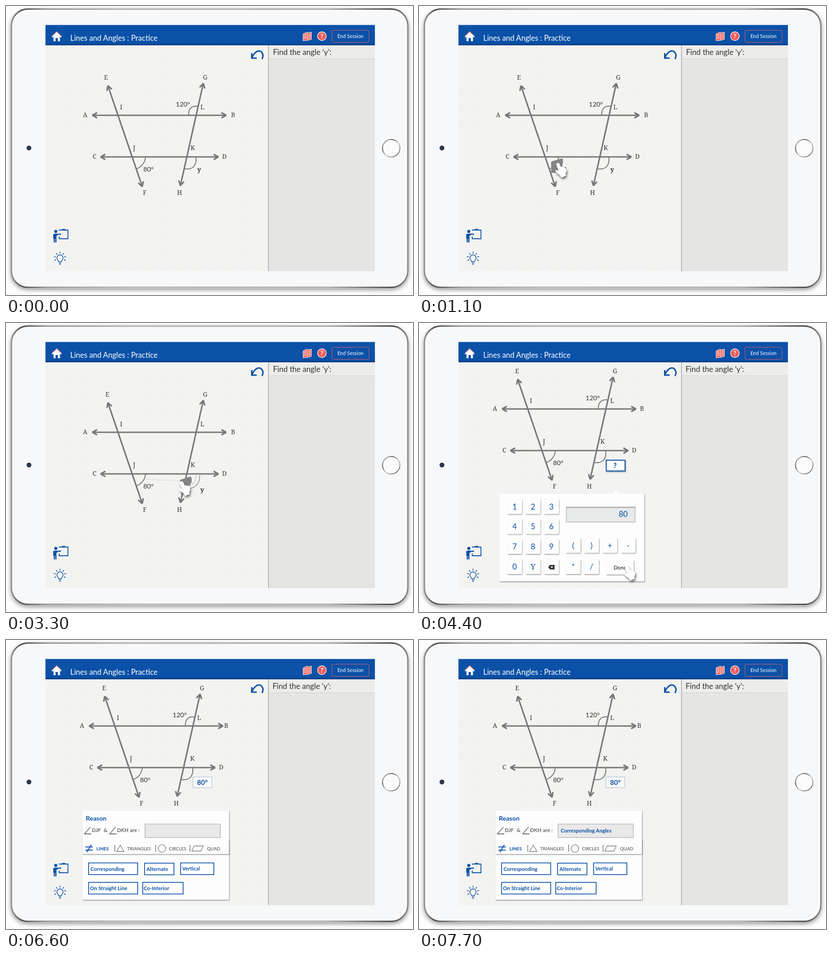
An HTML page for the animation above (8 s loop, 887 by 632 pixels).

```html
<!DOCTYPE html>
<html lang="en">
<head>
<meta charset="utf-8">
<title>Lines and Angles</title>
<style>
  html, body { margin: 0; width: 100%; height: 100%; overflow: hidden; background: #fdfdfd; }
  svg { display: block; width: 100vw; height: 100vh; }
  text { font-family: Lato, sans-serif; }
  .slab { font-family: "Noto Serif", serif; }
  .blue { fill: #0b51a8; }
  .line { fill: none; stroke: #777; }
  .ink { fill: none; stroke: #0b51a8; }
</style>
</head>
<body>
<svg viewBox="0 0 887 632">
  <defs>
    <linearGradient id="metal" x2="1" y2="0">
      <stop offset="0" stop-color="#8c8c8c"/><stop offset=".025" stop-color="#3c3c3c"/>
      <stop offset=".09" stop-color="#999"/><stop offset=".3" stop-color="#bbb"/>
      <stop offset=".8" stop-color="#b0b0b0"/><stop offset=".96" stop-color="#3c3c3c"/>
      <stop offset="1" stop-color="#808080"/>
    </linearGradient>
    <linearGradient id="ring" x2="1" y2="1">
      <stop offset="0" stop-color="#ddd"/><stop offset=".3" stop-color="#555"/>
      <stop offset=".55" stop-color="#ccc"/><stop offset="1" stop-color="#555"/>
    </linearGradient>
    <linearGradient id="edge" x2="0" y2="1">
      <stop offset="0" stop-color="#0b51a8"/><stop offset="1" stop-color="#083f86"/>
    </linearGradient>
    <pattern id="dots" width="5" height="5" patternUnits="userSpaceOnUse">
      <path d="M1 1h1v1h-1z" fill="#ebebe8"/>
    </pattern>
    <filter id="soft" x="-30%" y="-30%" width="180%" height="180%">
      <feDropShadow dx="1" dy="1.500" stdDeviation="1.2" flood-opacity=".42"/>
    </filter>
    <filter id="lift" x="-80%" y="-80%" width="300%" height="300%">
      <feDropShadow dx="2" dy="4" stdDeviation="3" flood-opacity=".6"/>
    </filter>
    <filter id="floor" x="-5%" y="-5%" width="110%" height="115%">
      <feDropShadow dx="0" dy="4" stdDeviation="4" flood-opacity=".38"/>
    </filter>
  </defs>

  <rect x="12" y="7" width="863.500" height="608" rx="36" fill="#f7f8fa" stroke="#c6c6c6" stroke-width="4.400" filter="url(#floor)"/>
  <rect x="11.500" y="6.500" width="864.500" height="609" rx="36.500" fill="none" stroke="url(#metal)" stroke-width="2.400"/>
  <rect x="15" y="10" width="857.500" height="602" rx="33" fill="none" stroke="#fff" stroke-width="2"/>
  <circle cx="50" cy="310.500" r="5.200" fill="#2b323e"/>
  <circle cx="49" cy="311" r="2" fill="#28477a"/>
  <circle cx="839.500" cy="311" r="19" fill="#fbfbfc" stroke="url(#ring)" stroke-width="2"/>

  <path d="M86 86h486v494H86z" fill="#f3f3f1"/>
  <path d="M86 86h486v494H86z" fill="url(#dots)"/>
  <path d="M572 86h232v494H572z" fill="#e5e5e4"/>
  <path d="M572 86h232v29H572z" fill="#ececea"/>
  <path d="M572 115.500h232" stroke="#cfcfcf"/>
  <path d="M572 86v494" stroke="#b9b9b9" stroke-width="2"/>
  <path d="M86 41.500h718V86H86z" fill="#0b51a8"/>
  <path d="M86 80h718v6H86z" fill="url(#edge)"/>

  <path d="M103.500 67l7-7 7 7v10h-4.500v-7h-5v7h-4.500z" fill="#fff"/>
  <path d="M100.500 68l10-10 10 10" fill="none" stroke="#fff" stroke-width="2.500"/>
  <path d="M100 66l10.500-10 10.500 10" fill="none" stroke="#e0737a" stroke-width="1.300"/>
  <text x="140" y="75.500" font-size="16.400" fill="#fff">Lines and Angles : Practice</text>

  <path d="M647.500 61l9-4 1 2 8-2v16l-8 2-10 1z" fill="#f0625f" stroke="#fff"/>
  <path d="M657 60v15M649 63l6-2m-6 5l6-2m-6 5l6-2m-6 5l6-2M659 62l5-1m-5 4l5-1m-5 4l5-1m-5 4l5-1" stroke="#fff" fill="none"/>
  <circle cx="688.500" cy="66" r="9.500" fill="#ee5b59" stroke="#fff" stroke-width="1.300"/>
  <text x="688.500" y="71" font-size="14" font-weight="700" fill="#fff" text-anchor="middle">?</text>
  <rect x="710.500" y="53" width="80.500" height="26.500" rx="3" fill="none" stroke="#d9606b"/>
  <text x="750.700" y="70" font-size="10.900" fill="#fff" text-anchor="middle">End Session</text>

  <path class="ink" stroke-width="3" d="M535.500 103v11h11M536 113C541 101 550 95 556 100Q563 106 558 116"/>
  <g class="ink" stroke-width="1.800">
    <path d="M116 491v-1h19v19h-19v-5M121 490h9"/>
    <path d="M122 489h7" stroke-width="3"/>
    <path d="M112 499h8" stroke-width="2.500"/>
  </g>
  <circle class="blue" cx="108.500" cy="493" r="3.400"/>
  <path class="blue" d="M103 500q0-2 2-2h8v4h-3v15h-2.500v-8h-1v8H104v-8h-1z"/>
  <g class="ink" stroke-width="1.500">
    <path d="M114.500 559c0-3-3.500-4-3.500-8a6.700 6.700 0 0 1 13.400 0c0 4-3.500 5-3.500 8zM115 562h5.500M116 565h3.500"/>
    <path id="rays"/>
  </g>
  <g id="scene"></g>
</svg>
<script>
const STEP = 1100, LOOP = 8000;
const scene = document.getElementById('scene');

const text = (s, x, y, size, attrs = '') => `<text x="${x}" y="${y}" font-size="${size}" ${attrs}>${s}</text>`;
const centered = (s, x, y, size, attrs) => text(s, x, y + size * .36, size, `text-anchor="middle" ${attrs}`);
const slab = (s, x, y, size = 13.5, attrs = '') => centered(s, x, y, size, `class="slab" fill="#333" ${attrs}`);
const degrees = (n, x, y) => centered(n + '°', x, y, 14.3, 'fill="#333"');
const bold = (s, x, y, size = 11.3, attrs = 'class="blue"') => text(s, x, y, size, `font-weight="700" ${attrs}`);
const path = (d, attrs) => `<path d="${d}" ${attrs}/>`;
const rect = (x, y, w, h, attrs) => `<rect x="${x}" y="${y}" width="${w}" height="${h}" ${attrs}/>`;
const group = (attrs, ...parts) => `<g ${attrs}>${parts.join('')}</g>`;
const raised = 'fill="#fdfdfd" filter="url(#soft)"';

document.getElementById('rays').setAttribute('d', Array.from({ length: 7 }, (_, i) => {
  const a = Math.PI * (.86 + i * 1.28 / 6), c = Math.cos(a), s = Math.sin(a);
  return `M${117.7 + 9.5 * c} ${551 + 9.5 * s}L${117.7 + 13.5 * c} ${551 + 13.5 * s}`;
}).join(''));

function arrow(x1, y1, x2, y2) {
  const angle = Math.atan2(y2 - y1, x2 - x1);
  const head = (x, y, a) => [-.5, .5].map(turn =>
    `M${x} ${y}L${x - 12 * Math.cos(a + turn)} ${y - 12 * Math.sin(a + turn)}`).join('');
  return path(`M${x1} ${y1}L${x2} ${y2}` + head(x1, y1, angle + Math.PI) + head(x2, y2, angle),
    'class="line" stroke-width="3.2"');
}

function diagram({ shift = '0 0', ex = 221, bx = 493, kx = 407, y = null, given = true, arcK = true }) {
  const labels = [['E', ex, 156], ['G', 434, 156], ['I', 251, 221], ['L', 428, 221], ['A', 172.5, 238.5],
    ['B', bx, 238.5], ['J', 279.5, 310], ['K', kx, 310], ['C', 193, 329.5], ['D', 476, 329.5],
    ['F', 302.5, 408.5], ['H', 378, 408]];
  const arc = d => path(d, 'class="line" stroke-width="2"');
  return group(`transform="translate(${shift})"`,
    arrow(188, 239, 480, 239), arrow(206, 330, 463, 330),
    arrow(222, 174, 297, 395), arrow(430, 169, 380, 393),
    arc('M304 331A29 29 0 0 1 284 356'),
    arcK ? arc('M414 331C416 349 406 359 389 356') : '',
    given ? arc('M398 239C397 225 405 217 418 219.5') + degrees(120, 385.5, 215) : '',
    degrees(80, 310.5, 357),
    ...labels.map(l => slab(...l)),
    y ? slab('y', ...y, 14, 'font-weight="700"') : '');
}

const question = x => text('Find the angle ‘y’:', x, 107, 16.6, 'fill="#333"');

// Origin at the fingertip.
const hand = (x, y, attrs = 'filter="url(#lift)"') => group(`transform="translate(${x} ${y}) scale(.94)"`,
  path('M-4 2C-5-4 2-5 4 0L7 7C9 5 11 6 12 8C14 6 16 8 16 10C19 9 20 13 19 17L17 24L19 26L8 31L5 26L-5 18C-8 14-4 12-1 15L1 15Z',
    `fill="#fcfcfc" ${attrs}`));
const wedge = (x, y, attrs = 'fill="#858585"') =>
  path(`M${x} ${y + 7}L${x + 25} ${y}C${x + 28} ${y + 16} ${x + 20} ${y + 26} ${x + 11} ${y + 32}H${x}Z`, attrs);
const trail = (x1, y1, x2, y2, color = '#bbb') => path(`M${x1} ${y1}L${x2} ${y2}`,
  `stroke="${color}" stroke-width="2" stroke-dasharray="0 6" stroke-linecap="round"`);

const answerBox = (done = false) => done
  ? rect(407.5, 299.5, 41, 23.5, 'fill="#fbfbfc" stroke="#b4c3dc" stroke-width="1.3"') +
    bold('80°', 428, 317, 14.5, 'class="blue" text-anchor="middle"')
  : rect(408, 300, 41, 23.5, 'fill="#fdfdfd" stroke="#0b51a8" stroke-width="2" filter="url(#soft)"') +
    text('?', 427.5, 317, 14.5, 'class="blue" font-weight="900" text-anchor="middle"');

const display = (opacity, ink) =>
  rect(321, 402.5, 150, 33, `fill="#e8eaea" stroke="#b5b5b5" stroke-width="1.5" opacity="${opacity}"`) +
  path('M321 403.5h150', `stroke="#999" stroke-width="2" opacity="${opacity * .6}"`) +
  centered('80', 445, 418, 17, `class="blue" opacity="${ink}"`);

function keypad(opacity) {
  const key = (s, x, y) => rect(x - 16, y - 16, 32, 32, `rx="1" ${raised}`) +
    (s === '⌫'
      ? path(`M${x - 7} ${y + 1}l4-5h10v10h-10z`, 'fill="#333"') +
        path(`M${x - 1} ${y - 1}l4 4m0-4l-4 4`, 'stroke="#fff" stroke-width="1.3"')
      : centered(s, x, y, 17, `class="blue${s === 'Y' ? ' slab' : ''}"`));
  const digits = [...'1234567890Y⌫'].map((s, i) => key(s, 208.5 + i % 3 * 40, 401.5 + (i / 3 | 0) * 43.8));
  const signs = [...'()+-*/'].map((s, i) => key(s, 336 + i % 4 * 40, i < 4 ? 486.5 : 533));
  return group(`opacity="${opacity}"`,
    rect(175, 373, 316, 192, raised), path('M422 373.5l6-9 6 9z', 'fill="#fdfdfd"'),
    ...digits, ...signs,
    rect(408, 519, 60, 31, raised), text('Done', 438, 539, 11.5, 'fill="#111" text-anchor="middle"'));
}

function reason(answer) {
  const grey = 'fill="#666"';
  const angle = x => path(`M${x + 13} 409L${x} 424H${x + 15}`, 'class="line" stroke-width="1.8"');
  const choice = (s, x, y, w, textX, textY) =>
    rect(x, y, w, 25.5, 'fill="#fff" stroke="#0b51a8" stroke-width="1.7"') + bold(s, textX, textY);
  return group('',
    rect(167, 373, 319, 195, raised), rect(167, 437, 319, 31, raised), rect(167, 432, 319, 10, 'fill="#fdfdfd"'),
    bold('Reason', 174, 394.5, 14),
    angle(171), bold('DJF', 187, 420, 11.3, grey), bold('&amp;', 213, 420, 11.3, grey),
    angle(226), bold('DKH are :', 242, 420, 11.3, grey),
    rect(303, 402.5, 164, 29.5, 'fill="#e9e9ea" stroke="#b8b8b8" stroke-width="1.5"'),
    bold(answer, 309, 421),
    path('M173 452.5h16M173 459.5h16M186 448l-10 16', 'class="ink" stroke-width="2"'),
    bold('LINES', 197, 459.5, 10),
    path('M237 448v15M326 448v15M401 448v15', 'class="line" stroke-width="1.5"'),
    path('M249 448.5l8 14h-16zM410 450.5h20l-5 11h-20z', 'class="line" stroke-width="1.3"'),
    '<circle cx="340" cy="456" r="8.3" class="line" stroke-width="1.3"/>',
    text('TRIANGLES', 264, 459.5, 9.8, 'fill="#444"'),
    text('CIRCLES', 355, 459.5, 9.8, 'fill="#444"'), text('QUAD', 438, 459.5, 9.8, 'fill="#444"'),
    choice('Corresponding', 180, 487.5, 107, 184, 505), choice('Alternate', 302, 488, 64, 306, 505),
    choice('Vertical', 380.5, 487.5, 72.5, 384, 504),
    choice('On Straight Line', 180, 530, 107, 183, 547), choice('Co-Interior', 298, 530, 88, 300, 547));
}

const up = options => question(581) + diagram({ shift: '-7 -51', ...options });
const low = options => question(582) + diagram({ bx: 495, ...options });

const scenes = [
  () => low({ ex: 218, y: [421, 358] }),
  () => low({ ex: 218, y: [421, 358] }) + wedge(288, 333) + hand(303, 346),
  () => low({ ex: 219, y: [422, 358] }) +
    wedge(288, 333, 'fill="#dededc" opacity=".8"') + hand(303, 346, 'opacity=".9" filter="url(#soft)"') +
    trail(305, 341, 331, 341, '#d5d5d3') + wedge(334, 334) + hand(349, 354),
  () => low({ y: [427.5, 365], given: false, arcK: false }) +
    path('M414 332C415 348 406 355 400 356', 'class="line" stroke-width="1.8" opacity=".25"') +
    path('M422 333C423 350 413 362 397 362', 'class="line" stroke-width="1.8" opacity=".7"') +
    trail(308, 342, 378, 345.5) +
    path('M379 343L403 335.5Q408 347 400 356H381Z', 'fill="#858585"') + hand(383, 349),
  () => up({}) + answerBox() + keypad(1) + display(1, 1) + hand(453, 534),
  () => up({}) + answerBox() + keypad(.2) + display(.6, .25) +
    path('M423 373l5-8 5 8z', 'fill="#ddd"') +
    trail(429, 331, 431, 338) + trail(434, 359, 441, 395) +
    text('80', 432, 353.5, 16.5, 'class="blue" font-weight="900" text-anchor="middle"'),
  () => up({ bx: 487, kx: 413 }) + answerBox(true) + reason(''),
  () => up({ bx: 487, kx: 413 }) + answerBox(true) + reason('Corresponding Angles'),
];

let shown = -1;
function draw() {
  const index = Math.floor(performance.now() % LOOP / STEP);
  if (index !== shown) scene.innerHTML = scenes[shown = index]();
  requestAnimationFrame(draw);
}
draw();
</script>
</body>
</html>
```
